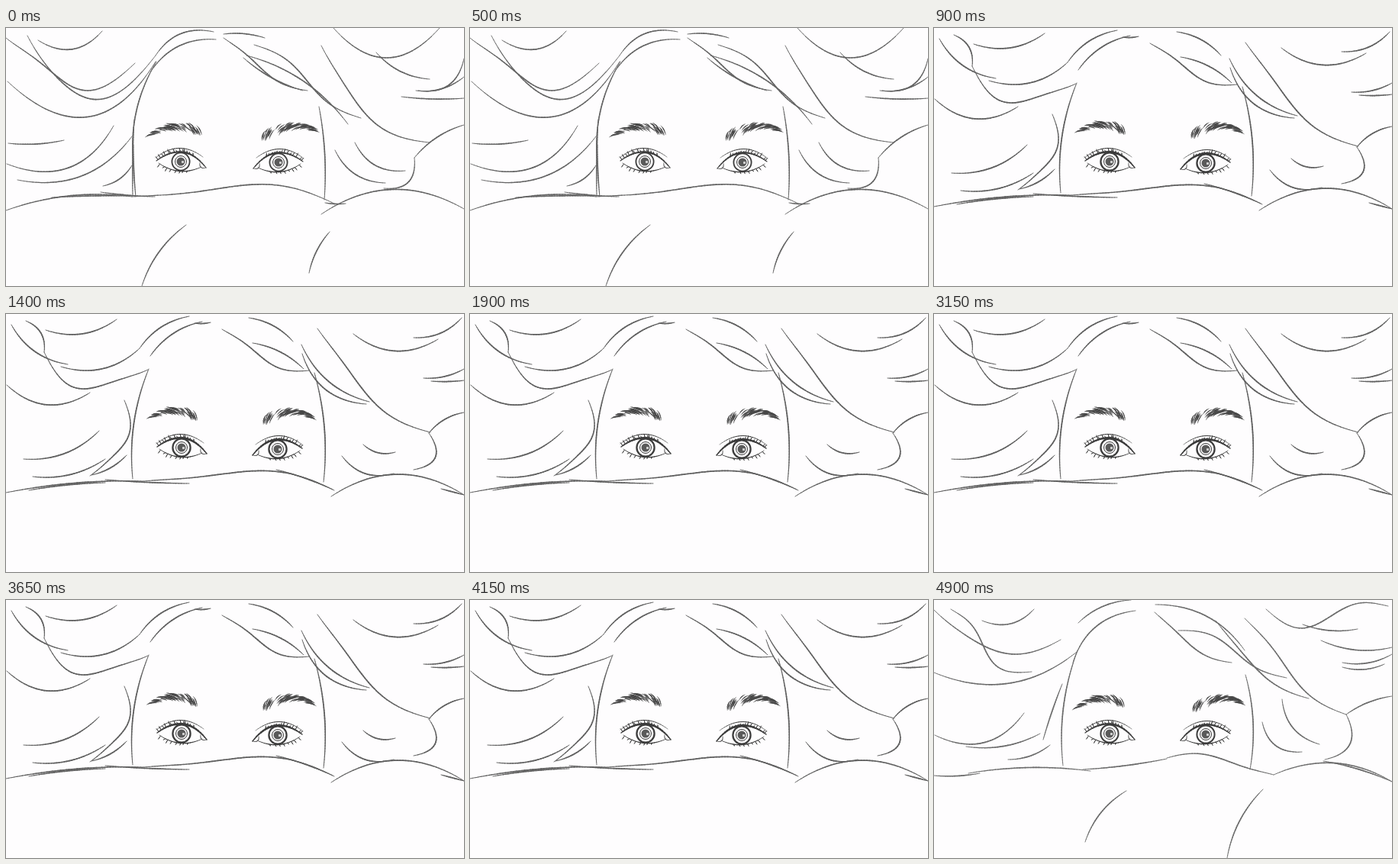
These frames come from a looping animation (600x338 px, 5000 ms). An HTML page with a canvas:

```html
<!DOCTYPE html>
<html lang="en">
<head>
<meta charset="utf-8">
<style>
  html, body { margin: 0; width: 100%; height: 100%; overflow: hidden; background: #fefdfe; }
  canvas { display: block; }
</style>
</head>
<body>
<canvas id="stage" width="600" height="338"></canvas>
<script>
// A pen stroke is "x0 y0 x1 y1 bow sway": a chord pushed sideways
// by an arch of height bow plus an S-wave of height sway.
const wide = {
  ink: '#646464', width: 1.65, lid: 1,
  left: `42 16 126 4 18, 0 13 169 46 42 -12, 28 10 196 36 68 -6, 2 70 196 44 60,
    189 58 275 15 -14, 196 36 272 5 -14, 197 44 166 170 10, 168 120 166 220 1,
    167 153 170 221 1, 3 151 76 147 3, 1 178 141 128 32, 15 199 165 142 25, 127 207 165 180 5`,
  right: `285 13 395 82 8 -4, 311 39 389 82 5, 315 36 448 126 -14, 285 8 339 13 -3,
    325 22 465 118 0 -8, 413 23 555 150 27 -5, 429 0 568 0 39, 485 32 555 67 8,
    540 82 600 40 17, 537 82 600 64 7, 518 90 600 92 2, 410 103 417 225 -4,
    431 160 497 203 12, 457 150 523 187 13, 600 127 535 170 6, 535 170 495 210 -17`,
  cloth: `0 239 165 221 -10, 60 222 165 220 -1, 124 215 195 221 1, 165 221 430 230 -18 7,
    413 244 600 237 -29, 418 229 445 230 1, 178 338 236 258 -8, 397 321 424 267 -4`,
  brows: [[182, 144, 220, 120, 257, 137], [408, 136, 375, 119, 335, 143]],
  eyes: [[229, 175], [357, 176]]
};

const soft = {
  ink: '#606060', width: 1.75, lid: 1.25,
  left: `7 14 81 66 11, 26 9 50 50 -9, 50 50 186 73 36 8, 52 21 145 7 12, 72 69 175 45 15,
    175 45 240 3 -8, 189 55 257 10 -8, 247 12 268 11 1, 187 72 166 216 9, 1 93 110 103 21,
    23 190 122 153 12, 35 213 130 190 9, 155 113 110 212 -23 -4, 112 211 158 185 4`,
  right: `283 20 397 74 11 -5, 318 5 376 36 -6, 323 38 390 72 -6, 387 40 476 115 14,
    388 52 472 118 18, 408 19 556 155 19 -5, 404 77 416 220 -7, 455 26 566 33 19,
    534 31 597 5 8, 547 84 600 72 4, 557 88 600 87 1, 600 129 554 156 5,
    554 156 534 204 -20, 440 186 508 209 12, 468 171 510 181 6`,
  cloth: `0 234 180 219 -5, 30 231 130 221 -2, 130 217 240 222 1, 180 219 430 231 -18 6,
    354 204 428 230 -2, 426 239 600 237 -28, 570 229 600 237 0`,
  brows: [[184, 138, 222, 118, 251, 136], [404, 138, 372, 118, 337, 140]],
  eyes: [[230, 175], [356, 177]]
};

const loose = {
  ink: '#6c6c6c', width: 1.65, lid: 1.1,
  left: `0 13 166 52 33 -4, 22 12 128 94 14 -11, 0 95 187 68 28, 63 27 131 12 12,
    189 30 258 0 -7, 182 82 264 14 -17, 188 66 169 217 9, 168 110 143 183 1,
    1 177 118 148 25, 42 192 139 175 8, 97 209 152 190 5`,
  right: `289 16 390 82 10 -3, 290 6 407 66 -17, 320 40 462 102 -5 -8, 369 27 491 129 14 -3,
    407 24 540 150 11 -6, 435 12 595 8 14 15, 483 32 555 38 5, 507 53 600 62 8,
    535 82 600 71 6, 535 88 590 84 5, 408 98 414 222 -7, 456 130 505 189 13,
    430 160 482 199 14, 600 126 540 150 4, 540 150 512 209 -21`,
  cloth: `0 230 60 227 2, 45 227 205 224 -6, 195 222 305 208 2, 305 207 445 229 -10 -4,
    445 229 600 238 -20, 510 211 600 238 -3, 198 317 252 250 -8, 384 338 431 248 -8`,
  brows: [[181, 145, 217, 119, 250, 137], [405, 137, 376, 119, 339, 142]],
  eyes: [[230, 175], [356, 176]]
};

const ctx = document.getElementById('stage').getContext('2d');

function seeded(seed) {
  return () => (seed = (seed * 16807) % 2147483647) / 2147483647;
}

function along([x0, y0, x1, y1, bow = 0, sway = 0], u) {
  const dx = x1 - x0, dy = y1 - y0;
  const push = (bow * 4 * u * (1 - u) + sway * Math.sin(2 * Math.PI * u)) / Math.hypot(dx, dy);
  return [x0 + dx * u - dy * push, y0 + dy * u + dx * push];
}

// Thinner towards both ends.
function pen(stroke, width, taper = 0.5) {
  const steps = Math.ceil(4 + Math.hypot(stroke[2] - stroke[0], stroke[3] - stroke[1]) / 4);
  for (let i = 0; i < steps; i++) {
    ctx.lineWidth = width * (1 - taper + taper * Math.sin(Math.PI * (i + 0.5) / steps));
    ctx.beginPath();
    ctx.moveTo(...along(stroke, i / steps));
    ctx.lineTo(...along(stroke, (i + 1) / steps));
    ctx.stroke();
  }
}

// Short hairs scattered about a curve from the outer end to the inner one.
function brow([x0, y0, x1, y1, x2, y2], random) {
  const outward = Math.sign(x0 - x2);
  for (let i = 0; i < 56; i++) {
    const u = 0.06 + 0.92 * random(), v = 1 - u;
    const spread = (random() - 0.5) * 8 * Math.min(1, 0.35 + u);
    const x = v * v * x0 + 2 * u * v * x1 + u * u * x2;
    const y = v * v * y0 + 2 * u * v * y1 + u * u * y2 + spread;
    const slope = Math.atan2(v * (y0 - y1) + u * (y1 - y2), Math.abs(v * (x0 - x1) + u * (x1 - x2)));
    const angle = slope - 0.1 - 0.45 * u - 0.25 * random(), half = 4 + random() * 3;
    const dx = outward * Math.cos(angle) * half, dy = Math.sin(angle) * half;
    pen([x - dx, y - dy, x + dx, y + dy, -outward], 1.15, 0.7);
  }
}

function lashes(edge, from, to, count, length, random) {
  for (let i = 0; i < count; i++) {
    const u = from + (to - from) * (i + random() * 0.6) / count;
    const [x, y] = along(edge, u);
    pen([x, y, x - 4 * (0.8 - u), y + length * (0.5 + random())], 1);
  }
}

// Drawn with the outer corner on the left; side -1 mirrors it.
function eye([x, y], side, weight, random) {
  const lid = [-32, -1, 33, 8, -16], under = [-29, 2, 27, 7, 8];
  ctx.save();
  ctx.translate(x, y);
  ctx.scale(side, 1);
  pen([-33, -5, 29, -6, -12], 1);
  pen(lid, 2.2 * weight);
  pen(under, 1.3);
  pen([25, 1, 33, 8, 4], 0.9);
  lashes(lid, 0, 0.75, 14, -4, random);
  lashes(under, 0, 0.75, 8, 3, random);
  ctx.lineWidth = 1.8 * weight;
  ctx.beginPath();
  ctx.arc(0, 0, 11.6, 0, 7);
  ctx.stroke();
  ctx.lineWidth = 1;
  ctx.beginPath();
  ctx.arc(0, 0, 7.5, 0, 7);
  ctx.stroke();
  ctx.beginPath();
  ctx.arc(0, 0, 5.5, 0, 7);
  ctx.fill();
  ctx.restore();
  ctx.fillStyle = '#ccc';
  ctx.fillRect(x + 1, y - 1, 3, 3);
}

function draw({ ink, width, lid, left, right, cloth, brows, eyes }) {
  const random = seeded(4127);
  ctx.fillStyle = '#fefdfe';
  ctx.fillRect(0, 0, 600, 338);
  ctx.lineCap = 'round';
  ctx.strokeStyle = ink;
  for (const stroke of [left, right, cloth].join().split(','))
    pen(stroke.trim().split(' ').map(Number), width);
  ctx.strokeStyle = '#484848';
  brows.forEach(spine => brow(spine, random));
  ctx.strokeStyle = '#3c3c3c';
  eyes.forEach((centre, i) => {
    ctx.fillStyle = '#5a5a5a';
    eye(centre, i ? -1 : 1, lid, random);
  });
}

// Twelve drawings a second on a 50 ms grid; the last one is held.
const cycle = [wide, loose, soft];
let shown;
function tick() {
  const time = Math.floor(performance.now() % 5000 / 50) * 50;
  const step = Math.min(58, Math.floor((time + 17) * 12 / 1000));
  const sketch = cycle[step % 3];
  if (sketch !== shown) draw(shown = sketch);
  requestAnimationFrame(tick);
}
tick();
</script>
</body>
</html>
```
